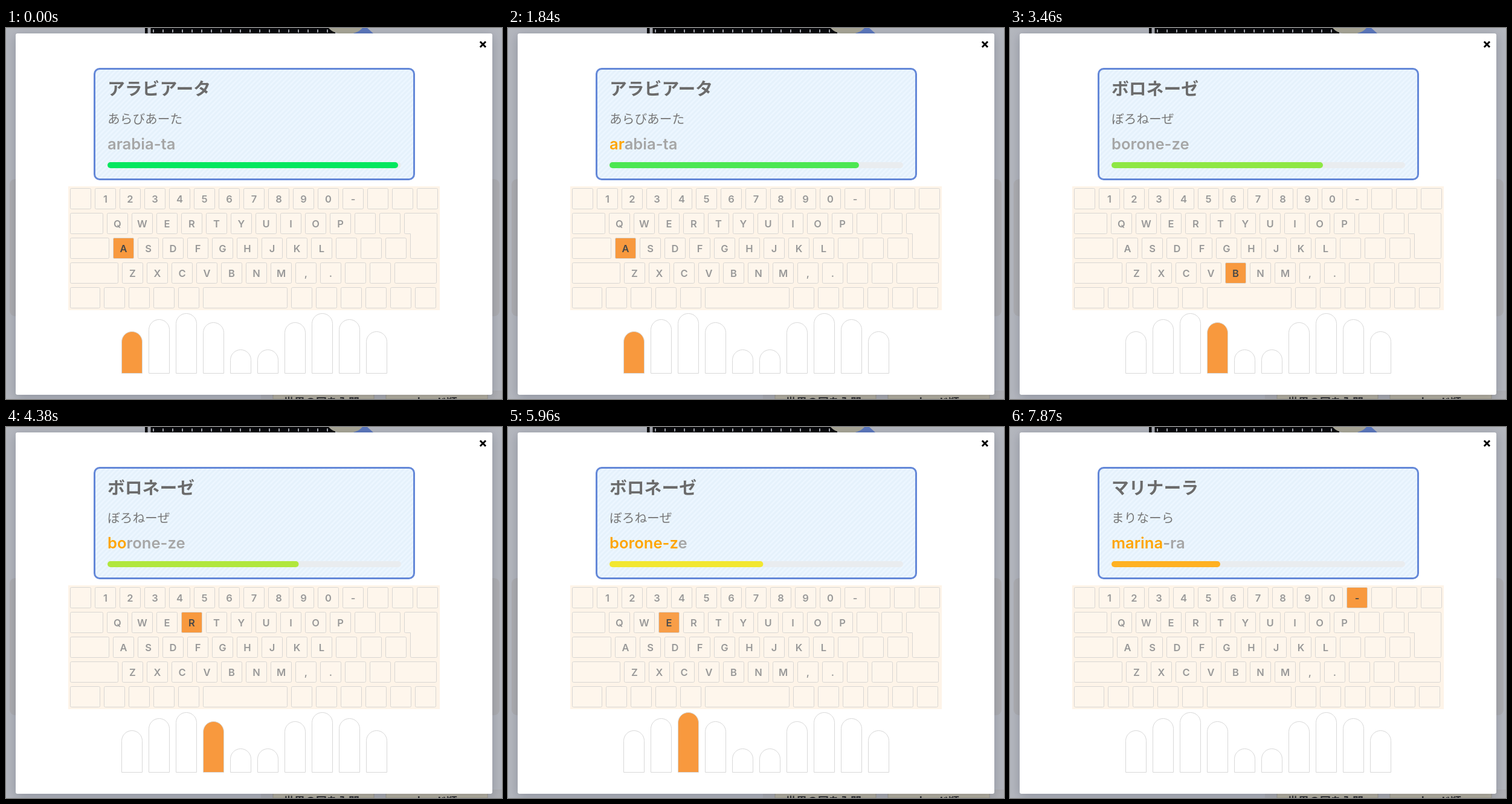
An HTML page for the animation above (8 s loop, 821 px wide and 614 px high).

```html
<!DOCTYPE html>
<html lang="ja">
<head>
<meta charset="utf-8">
<style>
  html, body { margin: 0; width: 100%; height: 100%; overflow: hidden; background: #b4b7be; }
  svg { display: block; font-family: Inter, "Noto Sans CJK JP", sans-serif; }
  .modal { fill: #fff; filter: drop-shadow(0 4px 9px rgba(0, 10, 40, .22)); }
  .key { fill: #fef6ec; stroke: #d8d6d3; }
  .label { font-size: 16.5px; font-weight: 600; text-anchor: middle; fill: #999; }
  .finger { fill: #fff; stroke: #d8d8d8; }
  .finger.on { fill: #f8993e; }
  #lit rect { fill: #f8993e; stroke: #d8d6d3; }
  #lit text { fill: #484848; }
  #title { font-size: 28.8px; font-weight: 700; fill: #6b6b6b; }
  #reading { font-size: 20.7px; font-weight: 300; fill: #777; }
  #romaji { font-size: 25.6px; font-weight: 600; fill: #a6a6a6; }
  #typed { fill: #ffa500; }
</style>
</head>
<body>
<svg width="821" height="614" viewBox="0 0 821 614">
  <defs>
    <pattern id="stripes" width="8" height="8" patternUnits="userSpaceOnUse">
      <rect width="8" height="8" fill="#ecf6ff"/>
      <path d="M-2 2L2-2M0 8L8 0M6 10L10 6" stroke="#e5f1fb" stroke-width="2.8"/>
    </pattern>
  </defs>
  <rect width="821" height="614" fill="#b4b7be"/>
  <rect x="6" y="250" width="811" height="227" rx="9" fill="#aeaeb1"/>
  <path d="M230 0H545V9H230Z" fill="#08090b"/>
  <path d="M237 0V9M243 5H540" stroke="#a9acb2" stroke-width="5"/>
  <path d="M245 5H540" stroke="#08090b" stroke-width="7" stroke-dasharray="14 2"/>
  <path d="M582 0H598L608 9H575Z" fill="#5d79bd"/>
  <ellipse cx="562" cy="-4" rx="29" ry="14" fill="#a9a797"/>
  <path d="M422 600H821V614H422Z" fill="#aeafb3"/>
  <path d="M442 600H609V614H442ZM629 600H797V614H629Z" fill="#b9b4a3" stroke="#9d998c"/>
  <g font-size="18" font-weight="700" fill="#333">
    <text x="459" y="626">世界の国を入門</text><text x="675" y="626">カード順</text>
  </g>
  <rect class="modal" x="16" y="9" width="789" height="598" rx="3"/>
  <path d="M784.8 22.5L794 31.7M794 22.5L784.8 31.7" stroke="#000" stroke-width="3"/>
  <rect x="146.5" y="67.5" width="529" height="183" rx="8.5" fill="url(#stripes)" stroke="#6488d8" stroke-width="3"/>
  <text id="title" x="168" y="111"></text>
  <text id="reading" x="168" y="158"></text>
  <text id="romaji" x="168" y="201"><tspan id="typed"></tspan><tspan id="rest"></tspan></text>
  <rect x="168" y="222" width="486" height="10" rx="5" fill="#e9ecef"/>
  <rect id="bar" x="168" y="222" height="10" rx="5"/>
  <rect x="103" y="262" width="615" height="205" fill="#fef4e8"/>
  <g id="keys"></g>
  <path class="key" d="M661.5 306.5H711.5Q713.5 306.5 713.5 308.5V379.5Q713.5 381.5 711.5 381.5H671.5Q669.5 381.5 669.5 379.5V340.5H661.5Q659.5 340.5 659.5 338.5V308.5Q659.5 306.5 661.5 306.5Z"/>
  <g id="lit"><rect width="34" height="34" rx="2"/><text class="label" x="17" y="23.5"></text></g>
  <g id="fingers"></g>
</svg>
<script>
const LOOP = 8000, BAR_FULL = 485;
const $ = id => document.getElementById(id);

function add(parent, tag, attrs, text = '') {
  const el = document.createElementNS('http://www.w3.org/2000/svg', tag);
  for (const name in attrs) el.setAttribute(name, attrs[name]);
  el.textContent = text;
  return parent.appendChild(el);
}

// Each row: key widths, and its labels starting at the given key
const unit = n => Array(n).fill(35);
const rows = [
  [unit(15), 1, '1234567890-'],
  [[55, ...unit(12)], 1, 'QWERTYUIOP'],
  [[65, ...unit(12)], 1, 'ASDFGHJKL'],
  [[80, ...unit(11), 70], 1, 'ZXCVBNM,.'],
  [[50, ...unit(4), 140, ...unit(6)], 0, '']
];
const keyPos = {};
rows.forEach(([widths, first, labels], r) => {
  let x = 106.5;
  const y = 265.5 + 41 * r;
  widths.forEach((width, i) => {
    add($('keys'), 'rect', { class: 'key', x, y, width: width - 1, height: 34, rx: 2 });
    const label = labels[i - first];
    if (label) {
      keyPos[label] = [x, y];
      add($('keys'), 'text', { class: 'label', x: x + 17, y: y + 23.5 }, label);
    }
    x += width + 6;
  });
});

const fingers = [70, 90, 100, 85, 40, 40, 85, 100, 90, 70].map((h, i) =>
  add($('fingers'), 'path', {
    class: 'finger',
    d: `M${191.5 + 45 * i} 571.5v${18 - h}a17 17 0 0 1 34 0v${h - 18}z`
  }));
const fingerOf = { a: 0, z: 0, e: 2, r: 3, t: 3, b: 3, n: 6, m: 6, i: 7, o: 8 };

// times: when each letter gets typed
const words = [
  { start: 0, title: 'アラビアータ', reading: 'あらびあーた', romaji: 'arabia-ta',
    times: [490, 1840, 2100, 2440, 2670, 2820, 2970, 3130] },
  { start: 3430, title: 'ボロネーゼ', reading: 'ぼろねーぜ', romaji: 'borone-ze',
    times: [3900, 4380, 4540, 4700, 4980, 5190, 5450, 5700] },
  { start: 6100, title: 'マリナーラ', reading: 'まりなーら', romaji: 'marina-ra',
    times: [6480, 6720, 6950, 7370, 7560, 7840] }
];

// Time and width of the remaining-time bar
const barStops = [[0, 481], [150, 481], [890, 447], [1020, 447], [1400, 427], [1810, 413],
  [1840, 413], [2490, 384], [3460, 350], [3530, 350], [5030, 291], [6760, 223],
  [6860, 223], [7870, 180], [8000, 180]];

function barWidth(t) {
  const i = barStops.findIndex(stop => stop[0] > t);
  const [t0, w0] = barStops[i - 1], [t1, w1] = barStops[i];
  return w0 + (w1 - w0) * (t - t0) / (t1 - t0);
}

function barColor(p) {
  const red = 255 * Math.min(1, 2 * (1 - p));
  const green = 231 - 420 * Math.max(0, .5 - p);
  return `rgb(${red}, ${green}, ${46 + 100 * (p - .5)})`;
}

function draw(t) {
  const word = words.findLast(w => w.start <= t);
  const count = word.times.filter(time => time <= t).length;
  const next = word.romaji[count];
  $('title').textContent = word.title;
  $('reading').textContent = word.reading;
  $('typed').textContent = word.romaji.slice(0, count);
  $('rest').textContent = word.romaji.slice(count);

  const width = barWidth(t);
  $('bar').setAttribute('width', width);
  $('bar').setAttribute('fill', barColor(width / BAR_FULL));

  const label = next.toUpperCase();
  const since = t - (count ? word.times[count - 1] : word.start);
  const phase = Math.max(0, since - 150) / 1000;
  $('lit').setAttribute('transform', `translate(${keyPos[label]})`);
  $('lit').setAttribute('opacity', .75 + .25 * Math.cos(2 * Math.PI * phase));
  $('lit').lastChild.textContent = label;
  fingers.forEach((finger, i) => finger.classList.toggle('on', i === fingerOf[next]));
}

function tick() {
  draw(performance.now() % LOOP);
  requestAnimationFrame(tick);
}
tick();
</script>
</body>
</html>
```
